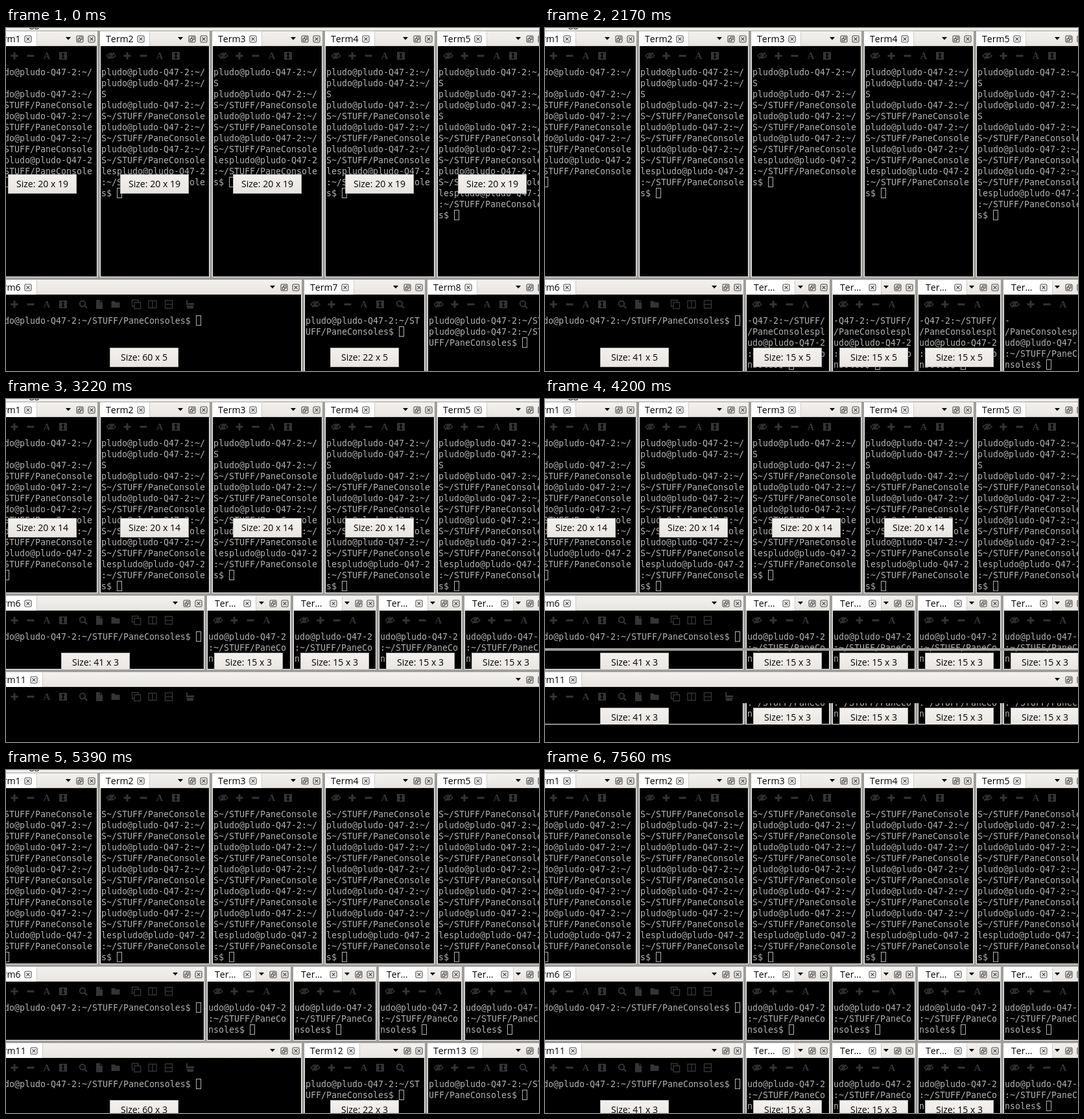
Animation, 822 px wide and 530 px high, one loop 8 s. Source, as an HTML page:

```html
<!DOCTYPE html>
<html lang="en">
<head>
<meta charset="utf-8">
<title>Docked terminals</title>
<style>
html, body { margin: 0; width: 100%; height: 100%; overflow: hidden; background: #000; }
#stage { display: block; width: 822px; height: 530px; }
.term { font: 13.29px "DejaVu Sans Mono", "Liberation Mono", monospace; fill: #b2b2b2; white-space: pre; }
.ui { font: 14.1px "Open Sans", "Noto Sans", sans-serif; font-kerning: none; fill: #000; }
.cursor { fill: none; stroke: #b2b2b2; }
.icon { fill: none; stroke: #343434; stroke-width: 1.4; }
.icon .solid { fill: #343434; stroke: none; }
.icon text { font: bold 15px "Liberation Serif", serif; fill: #343434; stroke: none; text-anchor: middle; }
.button { fill: none; stroke: #4a4a4a; stroke-width: 1.1; }
</style>
</head>
<body>
<svg id="stage" viewBox="0 0 822 530" xmlns="http://www.w3.org/2000/svg">
  <defs>
    <linearGradient id="bar" x2="0" y2="1">
      <stop offset="0" stop-color="#f3f1ef"/><stop offset="1" stop-color="#e8e5e1"/>
    </linearGradient>
  </defs>
  <g id="scene"></g>
</svg>
<script>
const W = 822, H = 530, LOOP = 8000, RIGHT = 835, GAP = 4, HEAD = 23, LINE = 17, CHAR = 8;
const GREY = '#a09e9b', EDGE = '#cfccc8';

// Terminal text, wrapped for each pane width
const USER = 'pludo@pludo-Q47-2', DIR = 'PaneConsoles', PATH = ':~/STUFF/';
const PROMPT = USER + PATH + DIR + '$ ';
const WRAP22 = [PROMPT.slice(0, 22), PROMPT.slice(22)];
const WRAP18 = [USER + ':', '~', DIR.slice(5) + USER.slice(0, 11),
  USER.slice(11) + PATH + DIR.slice(0, 3), DIR.slice(3) + '$ '];
const WRAP15 = [USER.slice(11) + PATH, '/' + DIR + USER.slice(0, 2), USER.slice(2),
  PATH + DIR.slice(0, 6), DIR.slice(6) + '$ '];

const HOME = USER + ':~/', CUT = 'S~/STUFF/' + DIR.slice(0, 11);
const log = (start, pairs) => [...start, ...Array(pairs).fill([HOME, CUT]).flat(),
  DIR.slice(9) + USER, PATH + DIR.slice(0, 11), DIR.slice(11) + '$ '];
const ONE = [HOME, 'S'], TWO = [HOME, HOME, 'S'];
const tall = [ONE, TWO, ONE, TWO, [...ONE, ...TWO]].map(s => log(s, 3));
const grown = [ONE, TWO, ONE, TWO, TWO].map(s => log(s, 4));
const full = Array(5).fill(log([CUT], 5));

// Left edges and column counts by number of panes in a row
const TOP = [-29, 145, 318, 492, 665];
const LEFTS = { 1: [-29], 2: [-29, 599], 3: [-29, 460, 650], 4: [-29, 372, 528, 683],
  5: [-29, 310, 443, 575, 707] };
const COLS = { 1: [107], 2: [77, 28], 3: [60, 22], 4: [49, 18], 5: [41, 15] };

const rect = (x, y, w, h, fill) => `<rect x="${x}" y="${y}" width="${w}" height="${h}" fill="${fill}"/>`;
const at = (x, y, cls, body) => `<g class="${cls}" transform="translate(${x} ${y})">${body}</g>`;
const path = (d, cls = '') => `<path class="${cls}" d="${d}"/>`;

// Shows the band (x, y, w, h) of a drawing, moved down by dy
const band = (body, x, y, w, h, dy = 0) =>
  `<svg x="${x}" y="${y + dy}" width="${w}" height="${h}" viewBox="${x} ${y} ${w} ${h}">${body}</svg>`;

const ICONS = [
  [17, path('M-7 0Q0 -8 7 0Q0 7 -7 0M-5 5L5 -5') + '<circle r="2.2"/>'],
  [42, path('M-5.5 -1.5h4v-4h3v4h4v3h-4v4h-3v-4h-4z', 'solid')],
  [67, path('M-5.5 -1.5h11v3h-11z', 'solid')],
  [92, '<text y="5">A</text>'],
  [117, path('M-6 -6h12v12h-12zM0 -5l-3 3h2v4h-2l3 3l3 -3h-2v-4h2z', 'solid')],
  [148, '<circle cx="-1" cy="-1" r="4.2" stroke-width="2"/><path d="M2 2L6 6" stroke-width="2.4"/>'],
  [173, path('M-5 -7h6v4h4v10h-10zM2 -7l3 3h-3z', 'solid')],
  [198, path('M-6.5 -5h5l1.5 2h6.5v8h-13z', 'solid')],
  [230, path('M-3 3H-6.500V-6.500H3V-3M-3 -3H6.500V6.500H-3z')],
  [255, path('M-6 -5.500H6V5.500H-6zM0 -5.500V5.500')],
  [280, path('M-5.500 -6H5.500V6H-5.500zM-5.500 0H5.500')],
  [313, path('M-6 -7h2v5h10v3h-12zM-5.500 2h11l-1 4.500h-9z', 'solid')]
];

const BOX = '<rect x="-5" y="-5" width="10" height="10" rx="1.8"/>';
const closeButton = (x, y) => at(x, y, 'button', BOX + path('M-2.500 -2.500L2.500 2.500M2.500 -2.500L-2.500 2.500'));
const floatButton = (x, y) => at(x, y, 'button', BOX +
  '<rect x="-2.800" y="-.5" width="3.500" height="3.500"/>' + path('M-1 -1v-2h4v4h-2'));

function popup(cx, y, label) {
  const x = Math.floor(cx - 53);
  return `<rect x="${x + .5}" y="${y + .5}" width="105" height="29" fill="url(#bar)" stroke="#b9b6b1"/>` +
    `<text class="ui" x="${x + 53}" y="${y + 20}" text-anchor="middle">Size: ${label}</text>`;
}

function header(n, x, right, y) {
  const short = right - x < 140, mid = y + 12;
  const closeX = x + (short ? 62 : n > 9 ? 72 : 63), tabEnd = closeX + 13;
  return rect(x, y, right - x, HEAD, 'url(#bar)') +
    rect(x, y, tabEnd - x, HEAD, '#fff') +
    rect(tabEnd, y + 1, 1, HEAD - 1, EDGE) + rect(tabEnd, y + HEAD - 1, right - tabEnd, 1, EDGE) +
    `<text class="ui" x="${x + (short ? 12 : 9)}" y="${mid + 5}">${short ? 'Ter…' : 'Term' + n}</text>` +
    closeButton(closeX, mid) +
    `<path d="M${right - 49} ${mid - 3}h8l-4 4.500z"/>` +
    floatButton(right - 27, mid) + closeButton(right - 9, mid);
}

function pane(n, x, right, y, bottom, lines) {
  const w = right - x, base = y + 68;
  let s = rect(x, y, w, bottom - y, '#fff') + header(n, x, right, y) +
    rect(x + 1, y + HEAD, w - 2, bottom - y - HEAD - 1, '#000');
  for (const [dx, body] of ICONS)
    if (dx + 22.2 <= w) s += at(x + dx, y + 38, 'icon', body);
  lines.forEach((t, i) => s += `<text class="term" x="${x + 2}" y="${base + i * LINE}">${t}</text>`);
  if (lines.length) {
    const i = lines.length - 1;
    s += `<rect class="cursor" x="${x + 2.5 + lines[i].length * CHAR}" y="${base + i * LINE - 12.5}" width="7" height="15"/>`;
  }
  return s;
}

// One row of panes; sizes are shown on panes from..to-1
function row({ first, xs, y, bottom, lines, cols, rows, popY, from = 0, to = 0 }) {
  return rect(0, y, W, bottom - y, GREY) + xs.map((x, i) => {
    const right = i + 1 < xs.length ? xs[i + 1] - GAP : RIGHT;
    let s = pane(first + i, x, right, y, bottom, lines[i]);
    if (i >= from && i < to) s += popup((x + right) / 2, popY, `${cols[i ? 1 : 0]} x ${rows}`);
    return band(s, x, y, right - x, bottom - y);
  }).join('');
}

const topRow = (logs, bottom, rows, from = 0, to = 0) =>
  rect(0, 0, W, H, GREY) + rect(0, 0, W, 4, '#f0eeeb') + '<text class="ui" x="36" y="-2">gg</text>' +
  row({ first: 1, xs: TOP, y: 5, bottom, lines: logs, cols: [20, 20], rows,
    popY: rows === 19 ? 226 : 184, from, to });

const group = (count, rest, o) => row({ xs: LEFTS[count], cols: COLS[count],
  lines: [[PROMPT], ...Array(count - 1).fill(rest)], ...o });

// Two-row stage
const low = (count, rest, to, extra) =>
  group(count, rest, { first: 6, y: 389, bottom: 540, rows: 5, popY: 494, to, ...extra });
const low3 = low(3, WRAP22, 2, { lines: [[PROMPT], WRAP22, [PROMPT.slice(0, 24), ...WRAP22]] });
const fiveLines = [[PROMPT], WRAP15, WRAP15, WRAP15, ['-', ...WRAP15.slice(1)]];
const low5 = to => low(5, WRAP15, to, { lines: fiveLines });
const tallTop = (from, to) => topRow(tall, 385, 19, from, to);

// Three-row stage
const mid = (from, to) => group(5, WRAP15.slice(2),
  { first: 6, y: 304, bottom: 418, rows: 3, popY: 392, from, to });
const base = (count, rest, to, extra) =>
  group(count, rest, { first: 11, y: 422, bottom: 540, rows: 3, popY: 510, to, ...extra });
const fullTop = topRow(full, 300, 14);
const settled = fullTop + mid(0, 0);
const wide = lines => topRow(grown, 300, 14, 0, 4) + mid(0, 5) + base(1, [], 0, { lines: [lines] });
const seam = rect(0, 385, W, GAP, GREY);
const pair = to => base(2, [PROMPT.slice(0, 28), PROMPT.slice(28)], to);
const base3 = base(3, WRAP22, 2);
const tail18 = WRAP18.slice(2);
const patch = (body, y) => band(body, 368, y, 312, H - y);

const lifted = topRow(tall, 300, 19) + low5(4) +
  band(rect(0, 300, W, 118, GREY) + topRow(tall, 300, 19) +
    group(5, WRAP15, { first: 6, y: 304, bottom: 540, rows: 5, popY: 409, to: 4, lines: fiveLines }),
    0, 0, W, 418) + seam;

const SCENES = [
  [0, tallTop(0, 5) + low3],
  [70, tallTop(2, 5) + low3],
  [140, tallTop(0, 0) + low3],
  [1050, tallTop(0, 0) + low3 + patch(low(4, WRAP18, 0), 389)],
  [1120, tallTop(0, 0) + low(4, WRAP18, 1)],
  [1190, tallTop(0, 0) + low(4, WRAP18, 2)],
  [2100, tallTop(0, 0) + low5(1)],
  [2170, tallTop(0, 0) + low5(4)],
  [3080, lifted],
  [3150, topRow(tall, 300, 14) + mid(0, 1) + base(1, [], 0, { lines: [[]] })],
  [3220, wide([])],
  [3430, wide([PROMPT])],
  [4200, wide([]) + band(wide([]), 0, 385, W, 33, 85) + seam],
  [4340, fullTop + mid(0, 5) + pair(0)],
  [4410, fullTop + mid(0, 5) + pair(1)],
  [5180, fullTop + mid(2, 5) + pair(1)],
  [5250, settled + pair(1)],
  [5320, settled + base(3, WRAP22, 1)],
  [5390, settled + base3],
  [6300, settled + base3 + patch(base(4, tail18, 0), 422)],
  [6440, settled + base(4, WRAP18.slice(0, 2), 3)],
  [6580, settled + base(4, tail18, 3)],
  [7420, settled + base(5, WRAP15.slice(2), 1)],
  [7490, settled + base(5, WRAP15.slice(2), 2)],
  [7560, settled + base(5, WRAP15.slice(2), 4)]
];

const scene = document.getElementById('scene');
let shown = null, start = null;

function draw(t) {
  const current = SCENES.findLast(([from]) => from <= t);
  if (current === shown) return;
  shown = current;
  scene.innerHTML = current[1];
}

function tick(now) {
  if (start === null) start = now;
  draw(Math.max(0, now - start) % LOOP);
  requestAnimationFrame(tick);
}
draw(0);
requestAnimationFrame(tick);
</script>
</body>
</html>
```
